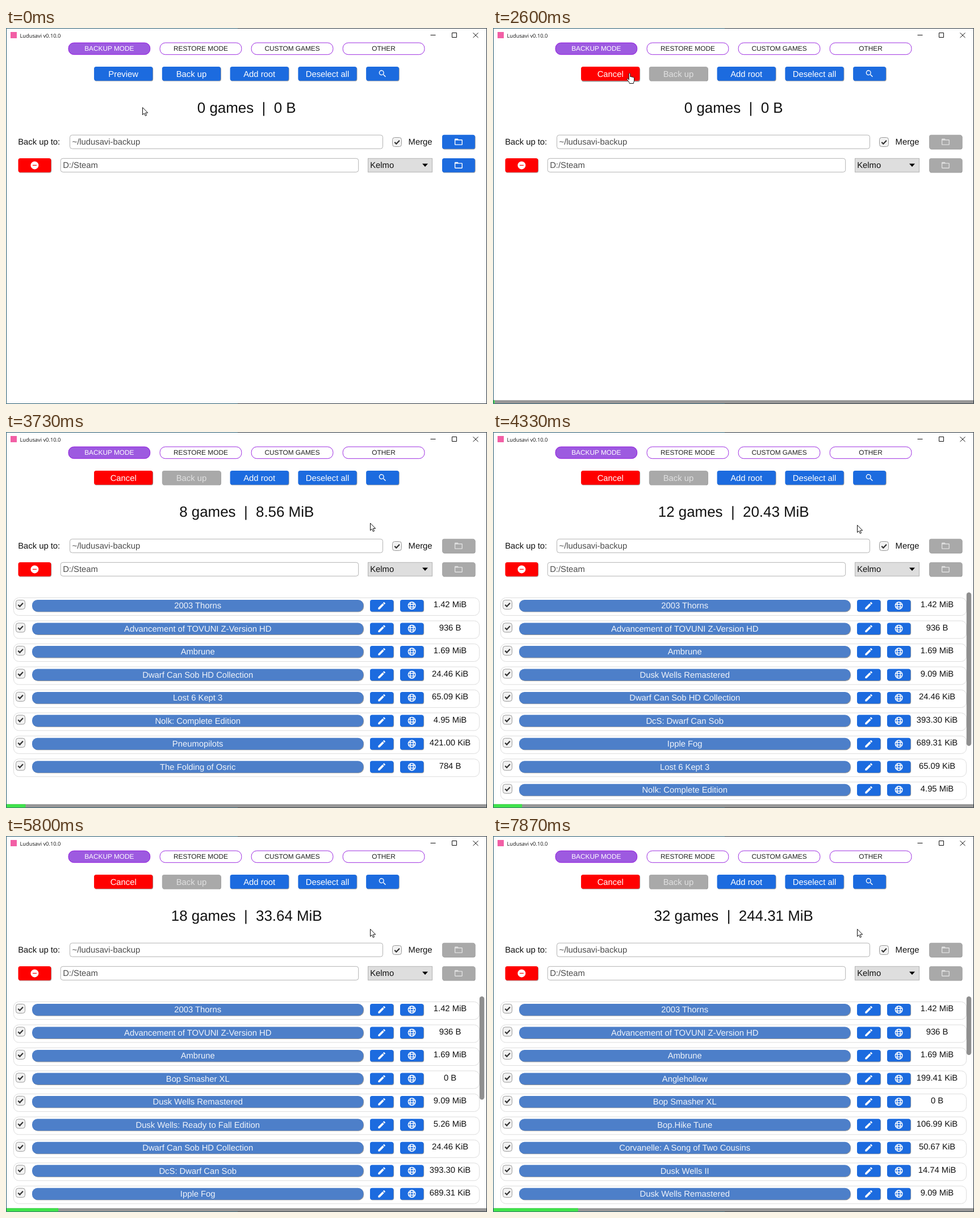
Animation, 847 px wide and 661 px high, one loop 8 s. Source, as an HTML page:

```html
<!DOCTYPE html>
<html lang="en">
<head>
<meta charset="utf-8">
<title>Ludusavi</title>
<style>
html, body { margin: 0; height: 100%; overflow: hidden; background: #fff; }
svg { display: block; width: 847px; height: 661px; font: 14.8px "Liberation Sans", Arial, sans-serif; text-rendering: geometricPrecision; }
</style>
</head>
<body>
<svg id="stage" viewBox="0 0 847 661"></svg>
<script>
const BLUE = '#1c6bdf', RED = '#f00', GRAY = '#a9a9a9', PURPLE = '#8800db';
const U = .826; // one layout unit in pixels
const H = 30 * U; // height of buttons
const RATE = 15, START = 39; // steps per second, step at which the scan begins

// name, size, step at which the game is found; sorted by name
const games = [
  ['2003 Thorns', '1.42 MiB', 40],
  ['Advancement of TOVUNI Z-Version HD', '936 B', 48],
  ['Ambrune', '1.69 MiB', 44],
  ['Anglehollow', '199.41 KiB', 106],
  ['Bop Smasher XL', '0 B', 82],
  ['Bop.Hike Tune', '106.99 KiB', 92],
  ['Corvanelle: A Song of Two Cousins', '50.67 KiB', 112],
  ['Dusk Wells II', '14.74 MiB', 98],
  ['Dusk Wells Remastered', '9.09 MiB', 58],
  ['Dusk Wells: Ready to Fall Edition', '5.26 MiB', 68],
  ['Dwarf Can Sob HD Collection', '24.46 KiB', 45],
  ['DcS: Dwarf Can Sob', '393.30 KiB', 64],
  ['Ipple Fog', '689.31 KiB', 61],
  ['Lost 6 Kept 3', '65.09 KiB', 43],
  ['Nolk: Complete Edition', '4.95 MiB', 41],
  ['Pneumopilots', '421.00 KiB', 53],
  ['The Folding of Osric', '784 B', 50]
];
// games below the visible rows: found ever faster, the later ones bigger
for (let i = 0; i < 15; i++) {
  const size = i < 3 ? 1.73 : i < 8 ? 2.242 : 26.979;
  games.push(['', size + ' MiB', 118 - (14 - i) ** 1.8 / 2]);
}

// step, x, y
const cursorPath = [[11, 240, 139], [15, 240, 137], [25, 240, 87], [30, 240, 79],
  [42, 240, 79], [45, 307, 131], [52, 641, 156], [60, 641, 163]];

function cursorAt(k) {
  const i = cursorPath.findIndex(p => p[0] > k);
  const b = cursorPath.at(i), a = cursorPath[i - 1] || b;
  const f = a === b ? 0 : (k - a[0]) / (b[0] - a[0]);
  return [1, 2].map(j => a[j] + (b[j] - a[j]) * f);
}

const rect = (x, y, w, h, r, fill, more = '') =>
  `<rect x="${x}" y="${y}" width="${w}" height="${h}" rx="${r}" fill="${fill}" ${more}/>`;
const text = (s, x, y, fill = '#111', more = 'text-anchor="middle"') =>
  `<text x="${x}" y="${y}" fill="${fill}" ${more}>${s}</text>`;
const left = (s, x, y, fill) => text(s, x, y, fill, '');
const path = (d, more = '') => `<path d="${d}" ${more}/>`;

const icons = {
  folder: path('M20 6h-8l-2-2H4c-1.1 0-2 .9-2 2v12c0 1.1.9 2 2 2h16c1.1 0 2-.9 2-2V8c0-1.1-.9-2-2-2zm0 12H4V8h16z'),
  search: path('M15.5 14h-.8l-.3-.3A6.5 6.5 0 1 0 13.7 14.4l.3.3v.8l5 5 1.5-1.5zm-6 0a4.5 4.5 0 1 1 0-9 4.5 4.5 0 0 1 0 9z'),
  pencil: path('M3 17.2V21h3.8L17.8 9.9l-3.7-3.7zM20.7 7a1 1 0 0 0 0-1.4l-2.3-2.3a1 1 0 0 0-1.4 0l-1.9 1.8 3.8 3.8z'),
  globe: path('M3 12a9 9 0 1 0 18 0a9 9 0 1 0-18 0M8 12a4 9 0 1 0 8 0a4 9 0 1 0-8 0M4 9h16M4 15h16',
    'fill="none" stroke="currentColor" stroke-width="2"'),
  minus: path('M2 12a10 10 0 1 0 20 0a10 10 0 1 0-20 0M7 11v2h10v-2z', 'fill-rule="evenodd"')
};
const icon = (name, x, y, color) =>
  `<g transform="translate(${x} ${y}) scale(.7) translate(-12 -12)" fill="${color}" color="${color}">${icons[name]}</g>`;
const ink = fill => fill === GRAY ? '#e0e0e0' : '#fff';

const raised = (x, y, w, h, r, fill, lift = 1) =>
  rect(x + Math.min(lift, 1) * U, y + lift * U, w, h, r, '#000', 'opacity=".4"') + rect(x, y, w, h, r, fill);
const button = (label, i, fill = BLUE, lift) => {
  const x = 155.05 + i * 145 * U, w = 125 * U;
  return raised(x, 68, w, H, 3.7, fill, lift) + text(label, x + w / 2, 85.5, ink(fill));
};
const iconButton = (name, x, y, w = 70 * U, h = H, fill = BLUE) =>
  raised(x, y, w, h, 3.7, fill) + icon(name, x + w / 2, y + h / 2, ink(fill));
const input = (s, x, y, w) =>
  rect(x, y, w, 24, 4, '#fff', 'stroke="#b3b3b3"') + left(s, x + 4, y + 17, '#4d4d4d');
const check = (x, y) => rect(x, y, 16, 16, 4, '#f2f2f2', 'stroke="#999"') +
  path(`M${x + 3.8} ${y + 8.2}l3 3 5.6-6`, 'fill="none" stroke="#333" stroke-width="2.2"');

function tab(label, i) {
  const x = 110 + i * 195 * U, w = 174 * U;
  return rect(x, 26, w, 20.7, 9.5, i ? '#fff' : '#9d5ae0', `stroke="${PURPLE}" stroke-width="${U}"`) +
    text(label, x + w / 2, 40.3, i ? '#222' : '#fff', 'text-anchor="middle" font-size="11.85"');
}

function gameRow([name, size], i) {
  const y = 295, w = 50 * U, h = 25 * U;
  return `<g transform="translate(0 ${i * 49 * U})">` +
    rect(13.5, 291.5, 820, 31, 9, '#fff', 'stroke="#ddd"') + check(17.5, 295.5) +
    raised(46, y, 583.3, h, 9.3, '#4d7fc9') + text(name, 337.7, 310.3, '#f0f4fa') +
    iconButton('pencil', 641, y, w, h) + iconButton('globe', 694, y, w, h) +
    text(size, 782, 308.4) + '</g>';
}

function summary(found) {
  const unit = { B: 1 / 1048576, KiB: 1 / 1024, MiB: 1 };
  const total = found.reduce((sum, g) => {
    const [n, u] = g[1].split(' ');
    return sum + n * unit[u];
  }, -.003); // the listed sizes are rounded
  return `${found.length} games\u00a0 |\u00a0 ${found.length ? total.toFixed(2) + ' MiB' : '0 B'}`;
}

function cursor(x, y, hand) {
  const d = hand
    ? 'M-.8 12V1.8C-.8 0 1.8 0 1.8 1.8V7C2.4 6 4.3 6.2 4.3 7.5c.5-1 2.4-.6 2.4.6.5-.8 2-.4 2 1V13c0 2-1.3 3-1.4 5.5H.4C-.2 15.5-2.6 13.5-4 11.4-4.8 10-3 9-2 10.3Z'
    : 'M.5.7V13.6L3.4 10.9 5.4 15.4 7.5 14.5 5.6 10.1H9.7Z';
  return path(d, `transform="translate(${x} ${y})" fill="#fff" stroke="#111"`);
}

const frame =
  rect(0, 0, 847, 661, 0, '#fff') +
  path('M408 .5H.5V660.5H408', 'fill="none" stroke="#23586d"') +
  path('M408 .5H846.5V660.5H408', 'fill="none" stroke="#26323a"') +
  rect(8, 7, 11, 11, 0, '#f25fa5') +
  text('Ludusavi v0.10.0', 24.5, 16.5, '#111', 'font-size="9.3" font-family="Open Sans, sans-serif"') +
  path('M747.5 12.5h9M785.5 8.5h8v8h-8zM822.5 8.5l9 8.5M831.5 8.5l-9 8.5', 'fill="none" stroke="#111"') +
  ['BACKUP MODE', 'RESTORE MODE', 'CUSTOM GAMES', 'OTHER'].map(tab).join('') +
  button('Add root', 2) + button('Deselect all', 3) + iconButton('search', 634.1, 68) +
  left('Back up to:', 21.2, 205.2) + input('~/ludusavi-backup', 112.5, 188.2, 551) +
  check(680.5, 192.5) + left('Merge', 708.6, 205.2) +
  iconButton('minus', 21.5, 229, 70 * U, H, RED) + input('D:/Steam', 96.2, 229.3, 524.5) +
  rect(637.5, 229.3, 113, 24, 0, '#dedede', 'stroke="#b3b3b3"') + left('Kelmo', 641.2, 246.2) +
  path('M733 238.4h10l-5 5.6z', 'fill="#000"');

function scene(k) {
  const busy = k >= START;
  const found = games.filter(g => k >= g[2]);
  const n = found.length;
  const [x, y] = cursorAt(k);
  const hover = y < 93 && x < 259;
  const lift = k === 33 ? 0 : hover ? 2 : 1; // flat while pressed
  const idle = busy ? GRAY : BLUE;
  let s = frame + button(busy ? 'Cancel' : 'Preview', 0, busy ? RED : BLUE, lift) + button('Back up', 1, idle) +
    text(summary(found), 423.7, 149.2, '#111', 'text-anchor="middle" font-size="25.9"') +
    [187.8, 229].map(top => iconButton('folder', 768, top, 70 * U, H, idle)).join('') +
    found.slice(0, 9).map(gameRow).join('');
  if (n > 8) s += rect(833.8, 282, 8.4, 135000 / (40.5 * n + 14.6), 4.2, '#8f8f8f');
  if (busy) s += rect(1, 654.3, 845, 5.9, 0, '#969696') + rect(1, 654.3, 1.8 + (k - START) * 1.86, 5.9, 0, '#3fe34a');
  return s + cursor(x, y, hover);
}

const stage = document.getElementById('stage');
let shown = -1;
function tick() {
  const k = Math.min(119, Math.floor((performance.now() % 8000 + 5) * RATE / 1000));
  if (k !== shown) stage.innerHTML = scene(shown = k);
  requestAnimationFrame(tick);
}
tick();
</script>
</body>
</html>
```
